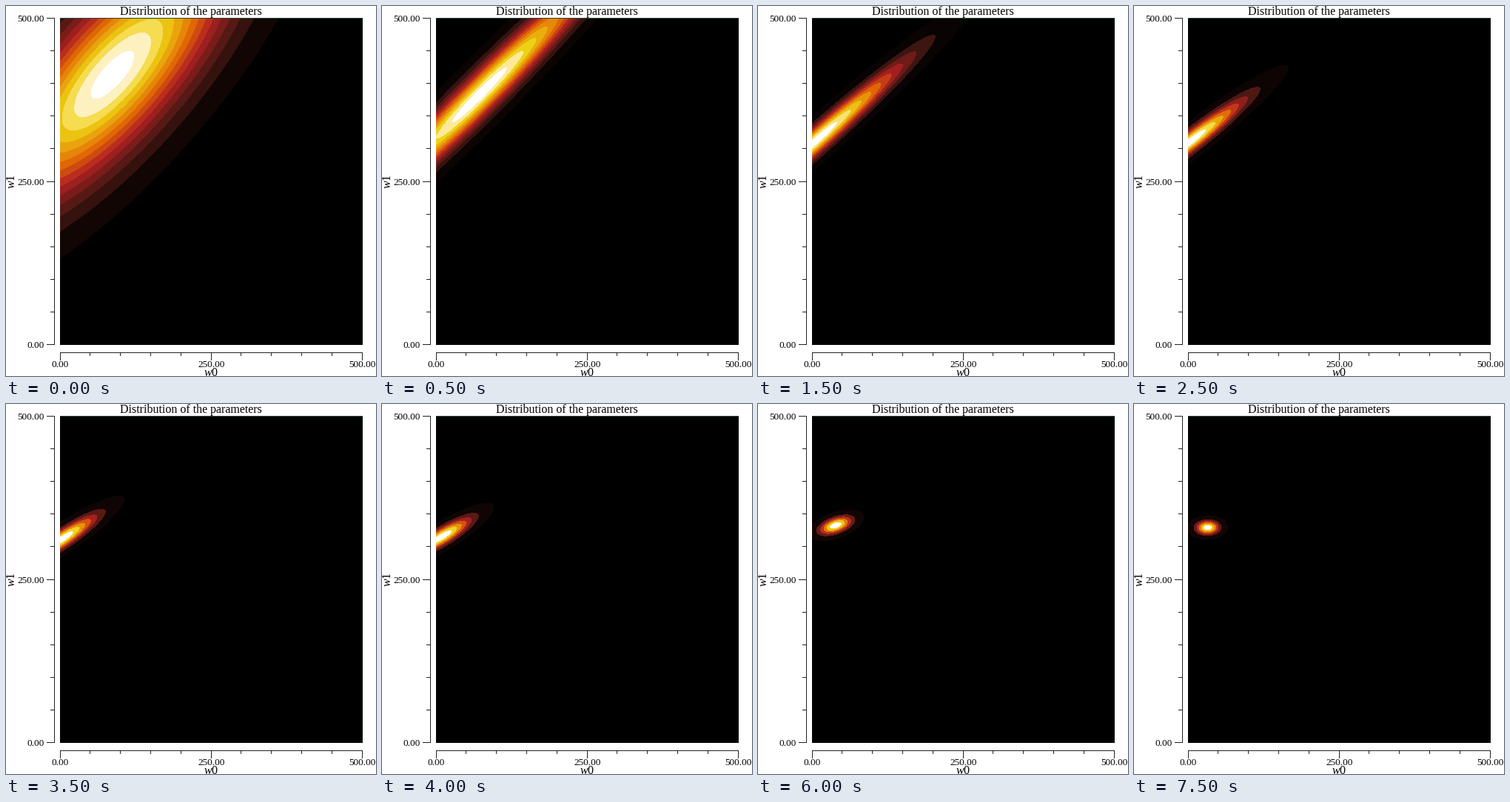
Recreate the animation shown at these times as a matplotlib script. Size 500 px wide and 500 px high, loop 8 s.

```python
import numpy as np
import matplotlib.pyplot as plt
from matplotlib.animation import FuncAnimation
from matplotlib.colors import LinearSegmentedColormap

SIZE, DPI = 500, 100
FRAMES, INTERVAL = 16, 500
LEFT, RIGHT, TOP, BOTTOM = 73, 482, 17, 458
PX = 72 / DPI
INK = "#222222"

plt.rcParams.update({
    "font.family": "Liberation Serif",
    "mathtext.fontset": "custom",
    "mathtext.rm": "Liberation Serif",
    "mathtext.it": "Liberation Serif:italic",
})

BLACK_BODY = LinearSegmentedColormap.from_list("black_body", [
    (0.00, "#000000"), (0.14, "#411712"), (0.39, "#b22222"), (0.58, "#e36905"),
    (0.84, "#eed214"), (0.92, "#fee68a"), (1.00, "#ffffff"),
], N=1024)

# Key points of the estimate: step, centre x, centre y, slope of the ridge
PATH = np.array([
    (0, 144, 93, 0.86),
    (1, 132, 120, 0.98),
    (3, 75, 185, 0.87),
    (7, 75, 183, 0.63),
    (12, 105, 164, 0.28),
    (15, 99.5, 167, 0.02),
])

xs, ys = np.meshgrid(np.arange(LEFT, RIGHT) + 0.5, np.arange(TOP, BOTTOM) + 0.5)


def density(step):
    """Gaussian relative to its peak, narrowing as observations add precision."""
    cx, cy, slope = (np.interp(step, PATH[:, 0], column) for column in PATH.T[1:])
    spread = 109 / np.sqrt(1 + step**3 / 32)
    thickness = 75 / np.sqrt(1 + 9.3 * step)
    dx, dy = xs - cx, cy - ys
    return np.exp(-((dx / spread) ** 2 + ((dy - slope * dx) / thickness) ** 2) / 2)


def density_image(step):
    count = 6 + round(8 * np.exp(-step / 4))
    phase = 0.2 + 0.3 * np.exp(-step)
    levels = (np.arange(count) + phase) / count
    shades = np.r_[0, np.minimum(levels * (1 + 1 / count), 1)]
    return BLACK_BODY(shades)[np.digitize(density(step), levels)]


fig = plt.figure(figsize=(SIZE / DPI, SIZE / DPI), dpi=DPI, facecolor="white")
ax = fig.add_axes([0, 0, 1, 1])
ax.axis("off")


def line(x0, y0, x1, y1, color=INK):
    ax.plot([x0, x1], [y0, y1], color=color, lw=PX, solid_capstyle="butt", snap=False)


def label(x, y, text, size, ha="center", rotation=0):
    ax.text(x, y, text, fontsize=size * PX, color="black", ha=ha, va="baseline",
            rotation=rotation, rotation_mode="anchor")


def draw_axes():
    line(LEFT, TOP - 0.5, RIGHT, TOP - 0.5, "#2a4a35")
    line(65.5, TOP - 1, 65.5, BOTTOM)
    line(LEFT, 468.5, RIGHT, 468.5)
    for i in range(11):
        major = i % 5 == 0
        x = np.floor(LEFT + 40.8 * i) + 0.5
        y = np.floor(BOTTOM - 0.5 - 44.1 * i) + 0.5
        line(x, 468, x, 479 if major else 473)
        line(55 if major else 60, y, 66, y)
        if major:
            text = f"{i * 50:.2f}"
            label(x, 488, text, 13.3)
            label(51.5, y + 4.7, text, 13.3, ha="right")
    label(250, 12, "Distribution of the parameters", 16)
    label(277.5, 500, "$w$0", 16)
    label(12, 237, "$w$1", 16, rotation=90)


image = ax.imshow(density_image(0), extent=(LEFT, RIGHT, BOTTOM, TOP),
                  interpolation="nearest", aspect="auto")
draw_axes()
ax.set_xlim(0, SIZE)
ax.set_ylim(SIZE, 0)


def update(step):
    image.set_data(density_image(step))
    return [image]


anim = FuncAnimation(fig, update, frames=FRAMES, interval=INTERVAL,
                     repeat=True, repeat_delay=0, blit=False)
plt.show()
```
